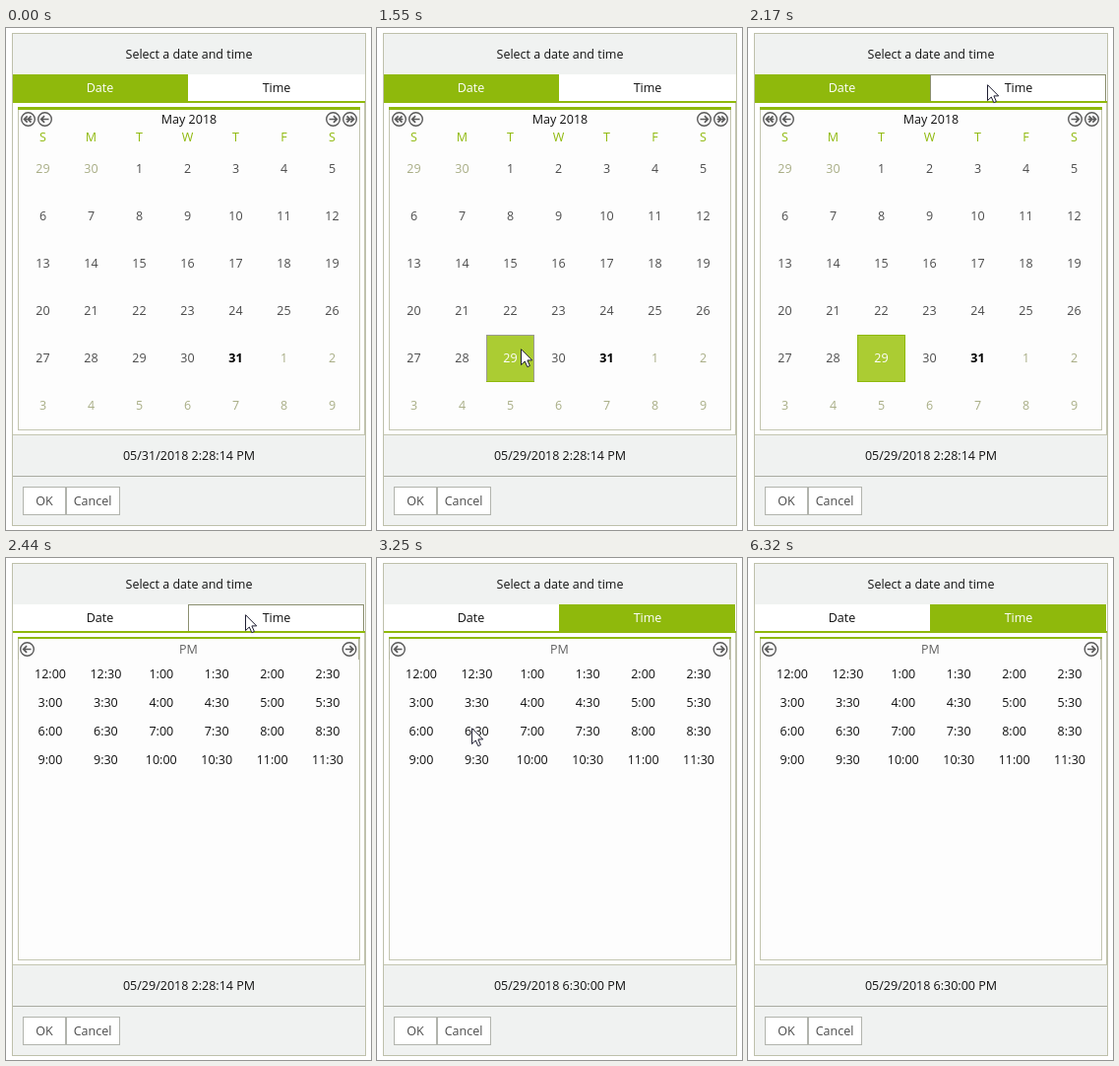
An HTML page for the animation above (7070 ms loop, 371 by 509 pixels).

```html
<!DOCTYPE html>
<html lang="en">
<head>
<meta charset="utf-8">
<title>Date and time picker</title>
<style>
  html, body { margin: 0; width: 100%; height: 100%; overflow: hidden; background: #fff; }
  svg { display: block; width: 371px; height: 509px; }
  text { font: 12.5px "Open Sans", "Noto Sans", sans-serif; text-anchor: middle; fill: #111; }
  rect, path { shape-rendering: crispEdges; }
  .day { fill: #4c4c4c; }
  .other { fill: #a8ad85; }
  .today { fill: #000; font-weight: 700; }
  .week { fill: #8fb90c; }
  .soft { fill: #606060; }
  .icon path, .icon circle, #cursor path { shape-rendering: auto; }
  .icon { fill: none; stroke: #5a5a5a; stroke-width: 1.4; }
</style>
</head>
<body>
<svg viewBox="0 0 371 509">
  <rect x="6.5" y="5.5" width="359" height="499" fill="#f0f2f1" stroke="#bec0ab"/>
  <text x="186" y="31">Select a date and time</text>

  <rect x="7" y="47" width="358" height="365" fill="#fff"/>
  <path d="M7 412.5H365M364.5 76V412" stroke="#c3c5b0"/>
  <rect id="dateTab" x="7" y="47" width="178" height="28"/>
  <rect id="timeTab" x="185" y="47" width="179" height="28"/>
  <rect id="tabEdge" x="185.5" y="47.5" width="178" height="27" fill="none" stroke="#8b8f70"/>
  <rect x="7" y="74" width="358" height="2" fill="#8fb90c"/>
  <text id="dateLabel" x="95.5" y="65">Date</text>
  <text id="timeLabel" x="275" y="65">Time</text>
  <rect x="12.5" y="80.5" width="347" height="327" fill="#fdfdfd" stroke="#c3c5b0"/>

  <g id="datePage">
    <rect x="12" y="80" width="348" height="3" fill="#8fb90c"/>
    <text x="186" y="97">May 2018</text>
    <rect id="pick" x="111.5" y="311.5" width="48" height="47" fill="#abcc33" stroke="#8fb90c"/>
    <g id="hover">
      <path d="M.5 48V.5H48.5V48" fill="none" stroke="#9a9a90"/>
      <path d="M0 47.5H49" stroke="#8fb90c"/>
    </g>
  </g>
  <g id="timePage">
    <rect x="12" y="80" width="348" height="2" fill="#8fb90c"/>
    <path d="M12.5 82V103M358.5 82V103" stroke="#b4b69f"/>
    <text class="soft" x="185.5" y="97">PM</text>
  </g>

  <text id="stamp" x="186" y="438"></text>
  <path d="M7 454.5H365" stroke="#aaaca2"/>
  <g fill="#fff" stroke="#b2b4ad">
    <rect x="17.5" y="465.5" width="43" height="28"/>
    <rect x="61.5" y="465.5" width="54" height="28"/>
  </g>
  <text class="day" x="39" y="484">OK</text>
  <text class="day" x="88" y="484">Cancel</text>

  <g id="cursor">
    <path d="M.5 .7V16.6L4.3 13L6.8 18.6L9.4 17.5L6.9 11.9H11.7Z" fill="#fff" stroke="#1e1e32"/>
  </g>
</svg>
<script>
const LOOP = 7070, GREEN = '#8fb90c', NS = 'http://www.w3.org/2000/svg';
const $ = id => document.getElementById(id);
const show = (id, on) => $(id).setAttribute('display', on ? 'inline' : 'none');
const fill = (id, color) => { $(id).style.fill = color; };

function add(parent, tag, attrs, content = '') {
  const el = document.createElementNS(NS, tag);
  for (const key in attrs) el.setAttribute(key, attrs[key]);
  el.textContent = content;
  return parent.appendChild(el);
}

function arrow(page, x, dir, double) {
  const g = add(page, 'g', { class: 'icon', transform: `translate(${x} 92.5) scale(${dir} 1)` });
  add(g, 'circle', { r: 6.8 });
  const d = double ? 'M-4 0H4M-3 -3.2L.2 0L-3 3.2M.8 -3.2L4 0L.8 3.2' : 'M-4 0H3.6M.4 -3.4L3.8 0L.4 3.4';
  add(g, 'path', { d, 'stroke-width': 1.7 });
}

const datePage = $('datePage'), timePage = $('timePage');
arrow(datePage, 22.5, -1, true);
arrow(datePage, 39.5, -1);
arrow(datePage, 332.5, 1);
arrow(datePage, 349.5, 1, true);
arrow(timePage, 21.5, -1);
arrow(timePage, 349, 1);

[...'SMTWTFS'].forEach((name, i) =>
  add(datePage, 'text', { class: 'week', x: 37.5 + 49 * i, y: 115 }, name));

const days = Array.from({ length: 42 }, (_, i) => {
  const n = i - 1;
  const kind = n < 1 || n > 31 ? 'other' : n === 31 ? 'today' : 'day';
  const label = n < 1 ? n + 30 : n > 31 ? n - 31 : n;
  return add(datePage, 'text',
    { class: kind, x: 37.5 + 49 * (i % 7), y: 147 + 48 * Math.floor(i / 7) }, label);
});

for (let i = 0; i < 24; i++) {
  const label = (i >> 1 || 12) + (i % 2 ? ':30' : ':00');
  add(timePage, 'text', { x: 45 + 56.4 * (i % 6), y: 122 + 29 * Math.floor(i / 6) }, label);
}

// Pointer moves: start, ms per step, then one position per step.
const moves = [
  [370, 88.4, [[328, 394], [284, 388], [240, 378], [200, 364], [168, 350], [146, 341], [138, 338]]],
  [1550, 88, [[146, 325], [178, 268], [222, 185], [262, 108], [277, 78], [243, 57]]],
  [2530, 90, [[236, 66], [212, 88], [178, 115], [142, 140], [114, 160], [100, 170], [96, 172]]],
  [6050, 90, [[105, 182], [205, 285], [360, 446]]]
];

function pointer(t) {
  if (t < 370 || t >= 6320) return null;
  const [start, step, points] = moves.filter(m => t >= m[0]).pop();
  return points[Math.min(points.length - 1, Math.floor((t - start) / step + 0.01))];
}

const PICKED = 30;

function draw(t) {
  const pos = pointer(t);
  const onTime = t >= 2260, picked = t >= 1180;
  const over = t >= 2170 && t < 2620;
  const timeGreen = onTime && (t < 2440 || t >= 2620);

  show('cursor', pos);
  if (pos) $('cursor').setAttribute('transform', `translate(${pos})`);

  show('datePage', !onTime);
  show('timePage', onTime);
  fill('dateTab', onTime ? '#fff' : GREEN);
  fill('dateLabel', onTime ? '#111' : '#fff');
  fill('timeTab', timeGreen ? GREEN : '#fff');
  fill('timeLabel', timeGreen ? '#fff' : '#111');
  show('tabEdge', over);

  let cell = -1;
  if (pos && !onTime && pos[1] >= 119)
    cell = Math.floor((pos[0] - 13) / 49) + 7 * Math.floor((pos[1] - 119) / 48);
  show('hover', cell >= 0);
  if (cell >= 0)
    $('hover').setAttribute('transform',
      `translate(${13 + 49 * (cell % 7)} ${119 + 48 * Math.floor(cell / 7)})`);
  show('pick', picked);
  days.forEach((day, i) => {
    day.style.fill = i === PICKED && picked ? '#fff' : i === cell ? '#000' : '';
  });

  $('stamp').textContent = `05/${picked ? 29 : 31}/2018 ${t >= 3250 ? '6:30:00' : '2:28:14'} PM`;
}

const origin = performance.now();
function tick() {
  draw((performance.now() - origin) % LOOP);
  requestAnimationFrame(tick);
}
tick();
</script>
</body>
</html>
```
